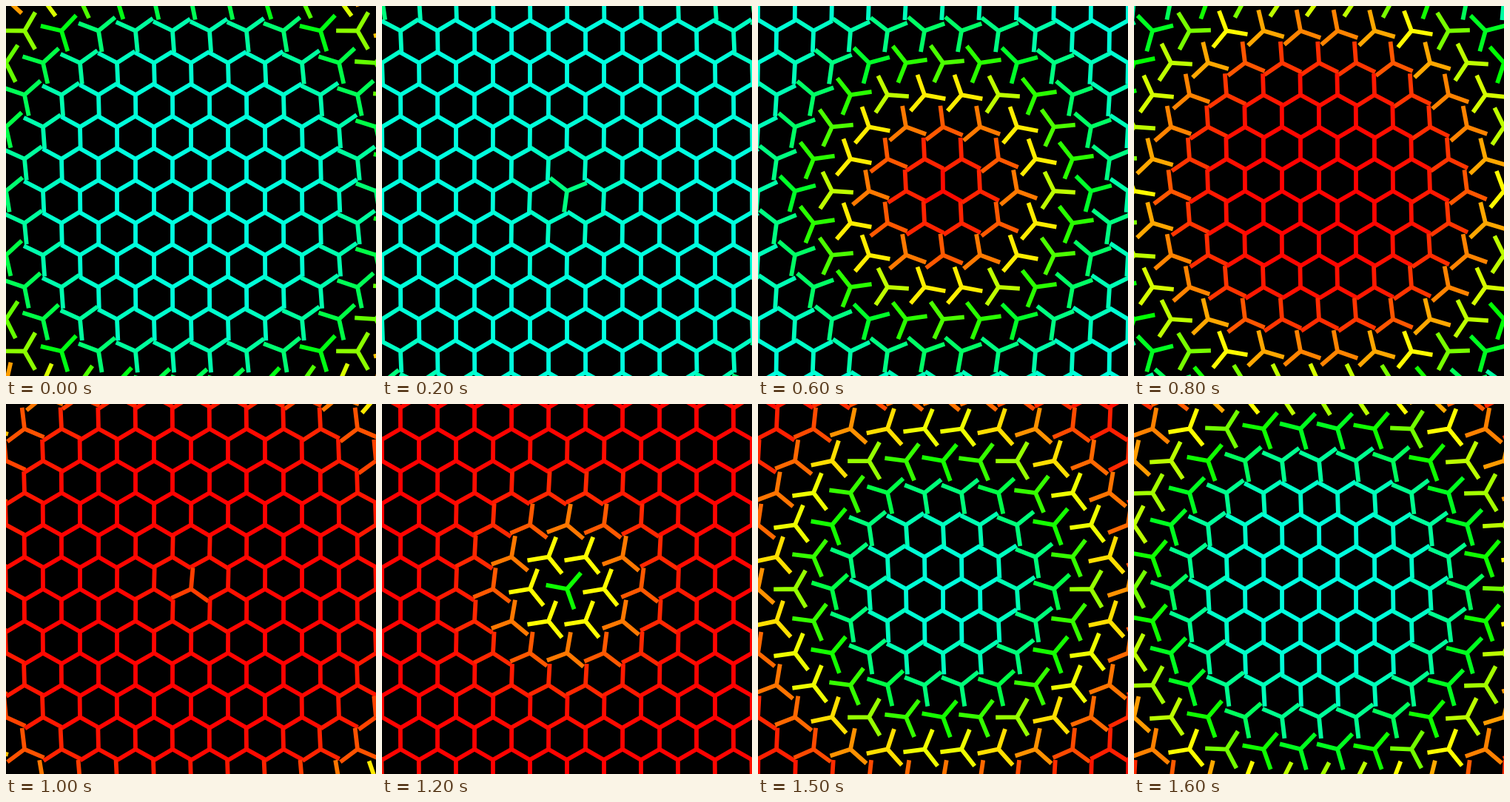
An HTML page with a canvas for the animation above (1.7 s loop, 500 by 500 pixels).

```html
<!DOCTYPE html>
<html lang="en">
<head>
<meta charset="utf-8">
<title>Turning hexagons</title>
<style>
  html, body { margin: 0; width: 100%; height: 100%; overflow: hidden; background: #000; }
  canvas { display: block; }
</style>
</head>
<body>
<canvas id="stage" width="500" height="500"></canvas>
<script>
const ctx = document.getElementById('stage').getContext('2d');

const LOOP = 1700, STEP = 100;
const GAP = 50, ROW = GAP * Math.sqrt(3) / 2, ARM = GAP / Math.sqrt(3);
const CENTER = 250, SPEED = 0.572, SOFT = 128;
const CYAN = 173;

// Times when the centre is halfway through a turn
const TO_RED = 321, TO_CYAN = 1153;
const WAVES = [TO_CYAN - LOOP, TO_RED, TO_CYAN, TO_RED + LOOP];

const nodes = [];
for (let r = -6; r <= 6; r++) {
  const shift = r % 2 ? GAP / 2 : 0;
  for (let c = -6; c <= 6; c++) {
    const dx = c * GAP + shift, dy = r * ROW;
    nodes.push({ x: CENTER + dx, y: CENTER + dy, delay: Math.hypot(dx, dy) / SPEED });
  }
}

// Number of sixth-turns made so far: soft steps spreading out from the centre
const turns = (t, delay) =>
  WAVES.reduce((sum, w) => sum + (1 + Math.tanh((t - delay - w) / SOFT)) / 2, 0);

function drawNode({ x, y, delay }, t) {
  const s = turns(t, delay);
  const tip = i => {
    const a = -Math.PI / 2 + s * Math.PI / 3 + i * Math.PI * 2 / 3;
    return [x + ARM * Math.cos(a), y + ARM * Math.sin(a)];
  };
  ctx.strokeStyle = `hsl(${CYAN * (1 - Math.abs(1 - s % 2))}, 100%, 50%)`;
  ctx.beginPath();
  ctx.moveTo(...tip(0));
  ctx.lineTo(x, y);
  ctx.lineTo(...tip(1));
  ctx.moveTo(x, y);
  ctx.lineTo(...tip(2));
  ctx.stroke();
}

const start = performance.now();

function frame() {
  const now = Math.max(0, performance.now() - start) % LOOP;
  const t = Math.floor(now / STEP) * STEP;
  ctx.fillStyle = '#000';
  ctx.fillRect(0, 0, 500, 500);
  ctx.lineWidth = 5.8;
  for (const node of nodes) drawNode(node, t);
  requestAnimationFrame(frame);
}
frame();
</script>
</body>
</html>
```
